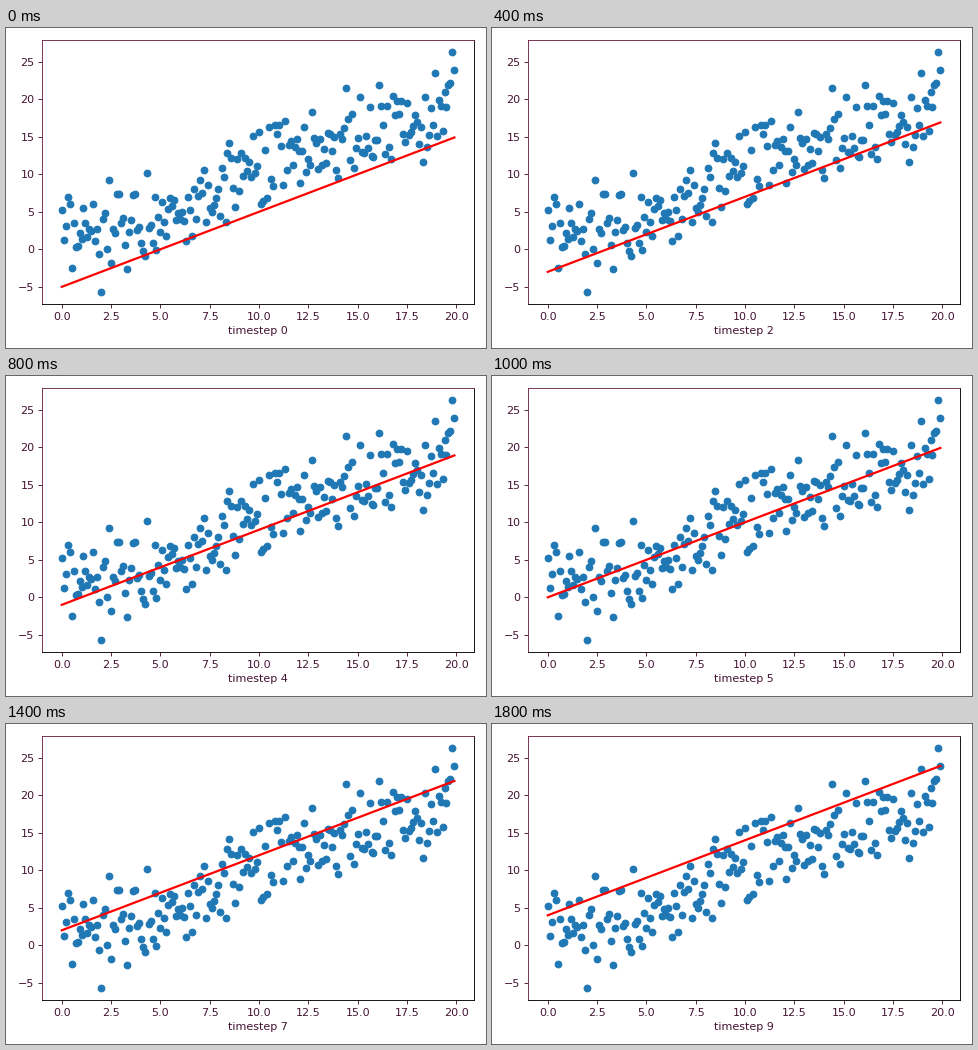
Write a matplotlib script that moves like this. It is 480 px wide and 320 px high and loops after 2000 ms.

```python
import matplotlib.pyplot as plt
import numpy as np
from matplotlib.animation import FuncAnimation

DPI = 80
STEPS = 10
STEP_MS = 200
INK = "#451433"
EDGE = "#6e2346"

plt.rcParams["font.family"] = "DejaVu Sans"
plt.rcParams["font.size"] = 10

fig, ax = plt.subplots(figsize=(480 / DPI, 320 / DPI), dpi=DPI)
fig.set_layout_engine("tight")

# Noisy points around y = x
np.random.seed(0)
x = np.arange(0, 20, 0.1)
ax.scatter(x, x + np.random.normal(0, 3.0, len(x)), color="#1f77b4")
line, = ax.plot(x, x - 5, color="#ff0000", linewidth=2)

ax.tick_params(color=INK, labelcolor=INK)
for side in ("left", "top"):
    ax.spines[side].set_color(EDGE)


def update(step):
    """Raise the line by one unit per step and count the steps below."""
    line.set_ydata(x - 5 + step)
    ax.set_xlabel(f"timestep {step}", color=INK)
    return line, ax


anim = FuncAnimation(fig, update, frames=STEPS, interval=STEP_MS,
                     repeat=True, repeat_delay=0)
plt.show()
```
